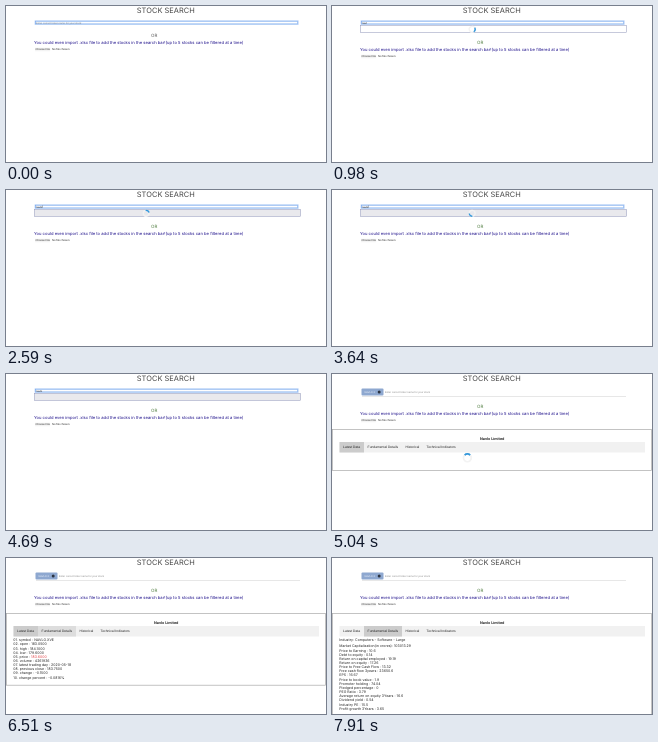
An HTML page with a canvas for the animation above (8000 ms loop, 320 by 156 pixels).

```html
<!DOCTYPE html>
<html lang="en">
<head>
<meta charset="utf-8">
<title>Stock search</title>
<style>
html, body { margin: 0; width: 100%; height: 100%; overflow: hidden; background: #fff; }
canvas { display: block; width: 320px; height: 156px; }
</style>
</head>
<body>
<canvas></canvas>
<script>
const LOOP = 8000, RESULT = 5040, HOVER = 5460, LOADED = 5880, DETAILS = 6720;
const UI = 'Inter, sans-serif', CONTROL = '"Liberation Sans", Arial, sans-serif';
const HINT = 'Enter correct ticker name for your stock';
const QUERY = 'navlo';
const TABS = [['Latest Data', 7.5, 32], ['Fundamental Details', 32, 70],
  ['Historical', 70, 91], ['Technical Indicators', 91, 128]];
const QUOTE = ['01. symbol : NAVLO.XVE', '02. open : 183.0500', '03. high : 184.1000',
  '04. low : 179.6000', '05. price : ', '06. volume : 4261936',
  '07. latest trading day : 2020-05-18', '08. previous close : 183.7500',
  '09. change : -0.1500', '10. change percent : -0.0816%'];
const FUNDAMENTALS = ['Market Capitalization(in crores): 103013.29', 'Price to Earning : 10.6',
  'Debt to equity : 0.14', 'Return on capital employed : 19.19', 'Return on equity : 17.26',
  'Price to Free Cash Flow : 13.32', 'Free cash flow 3years : 23650.6', 'EPS : 16.67',
  'Price to book value : 1.9', 'Promoter holding : 74.04', 'Pledged percentage : 0',
  'PEG Ratio : 3.79', 'Average return on equity 3Years : 16.6', 'Dividend yield : 0.54',
  'Industry PE : 15.5', 'Profit growth 3Years : 3.65'];

const canvas = document.querySelector('canvas');
const ctx = canvas.getContext('2d');
const ratio = window.devicePixelRatio || 1;
canvas.width = 320 * ratio;
canvas.height = 156 * ratio;

// Draws text centred vertically on y and returns its width.
function text(str, x, y, size, { color = '#222', font = UI, weight = 400, align = 'left' } = {}) {
  ctx.save();
  ctx.translate(x, y + size * 0.35);
  ctx.scale(0.1, 0.1);
  ctx.textRendering = 'geometricPrecision';
  ctx.font = `${weight} ${size * 10}px ${font}`;
  ctx.fillStyle = color;
  ctx.textAlign = align;
  ctx.fillText(str, 0, 0);
  const width = ctx.measureText(str).width / 10;
  ctx.restore();
  return width;
}

function fill(x, y, w, h, color, radius = 0) {
  ctx.fillStyle = color;
  ctx.beginPath();
  ctx.roundRect(x, y, w, h, radius);
  ctx.fill();
}

function outline(x, y, w, h, color, width) {
  ctx.strokeStyle = color;
  ctx.lineWidth = width;
  ctx.strokeRect(x, y, w, h);
}

function spinner(x, y, radius, degrees) {
  const start = (degrees - 135) * Math.PI / 180;
  ctx.lineWidth = radius * 0.38;
  for (const [color, sweep] of [['#f3f3f3', 2 * Math.PI], ['#3498db', Math.PI / 2]]) {
    ctx.strokeStyle = color;
    ctx.beginPath();
    ctx.arc(x, y, radius * 0.81, start, start + sweep);
    ctx.stroke();
  }
}

function importSection(y, orColor) {
  text('OR', 148.2, y, 4.5, { color: orColor, align: 'center' });
  text('You could even import .xlsx file to add the stocks in the search bar!(up to 5 stocks can be filtered at a time)',
    28, y + 7.7, 4.15, { color: '#1d0f8a' });
  fill(29, y + 12.6, 15.2, 3.6, '#f4f4f4');
  text('Choose File', 29.6, y + 14.4, 2.68, { font: CONTROL });
  text('No file chosen', 46, y + 14.4, 2.75, { font: CONTROL });
}

function searchField(t) {
  outline(29.3, 15, 262.6, 3.2, '#a9c8f5', 1.2);
  outline(29.6, 15.3, 262, 2.6, '#6c9fe6', 0.3);
  const typed = t < 140 ? '' : QUERY.slice(0, 1 + Math.floor((t - 140) / 230));
  if (typed) {
    const width = text(typed, 30, 16.6, 2.6, { font: CONTROL });
    if (Math.floor((t - 190) / 500) % 2 === 0) fill(30.2 + width, 15.4, 0.3, 2.4, '#222');
  } else {
    text(HINT, 30, 16.6, 2.6, { color: '#7b8794', font: CONTROL });
  }
}

function suggestions(t) {
  fill(28.5, 19.5, 266, 6.8, t < 2030 ? '#fff' : '#e9e9ed');
  outline(28.5, 19.5, 266, 6.8, '#8d93b8', 0.5);
  if (t < 4340) spinner(140.2, 23.3, 3.6, t * 0.18 - 74);
}

function selectedStock() {
  fill(29.5, 14.6, 22, 6.8, '#8ea8d0', 1);
  text('NAVLO.X', 32.5, 18, 2.5, { color: '#f4f7ff', font: CONTROL });
  fill(45.7, 16.5, 3, 3, '#2c3442', 1.5);
  text(HINT, 53, 18, 2.58, { color: '#888', font: CONTROL });
  fill(30, 21.9, 264, 0.5, '#cfcfcf');
}

function tabs(active, hovered) {
  fill(7.5, 68, 305.5, 10.5, '#f1f1f1');
  TABS.forEach(([label, left, right], i) => {
    if (i === active || i === hovered) fill(left, 68, right - left, 10.5, i === active ? '#ccc' : '#ddd');
    text(label, left + 3.6, 73.2, 3.32, { font: CONTROL });
  });
}

function rows(lines, y) {
  lines.forEach((line, i) => {
    const rowY = y + i * 4.15;
    const width = text(line, 7.3, rowY, 3.55);
    if (line.endsWith(': ')) text('183.6000', 7.3 + width, rowY, 3.55, { color: '#e0393e' });
  });
}

function resultPanel(t) {
  const bottom = t < LOADED ? 96.5 : t < DETAILS ? 127.2 : 160;
  outline(0.5, 55.4, 319, bottom - 55.4, '#aaa', 0.7);
  text('Navlo Limited', 160.2, 64.6, 3.66, { weight: 700, align: 'center' });
  tabs(t < DETAILS ? 0 : 1, t < HOVER ? -1 : 1);
  if (t < LOADED) {
    spinner(135.4, 83.8, 4.8, (t - RESULT) * 0.18);
  } else if (t < DETAILS) {
    rows(QUOTE, 82);
  } else {
    rows(['Industry: Computers - Software - Large'], 82);
    rows(FUNDAMENTALS, 88.2);
  }
}

function draw(now) {
  const t = now % LOOP;
  ctx.setTransform(ratio, 0, 0, ratio, 0, 0);
  fill(0, 0, 320, 156, '#fff');
  text('STOCK SEARCH', 159.8, 4.4, 7.47, { color: '#444', align: 'center' });
  if (t < RESULT) {
    const open = t >= 350;
    searchField(t);
    if (open) suggestions(t);
    importSection(open ? 36.1 : 29.1, open ? '#4c7a3c' : '#555');
  } else {
    selectedStock();
    importSection(32.1, '#4c7a3c');
    resultPanel(t);
  }
  requestAnimationFrame(draw);
}
requestAnimationFrame(draw);
</script>
</body>
</html>
```
